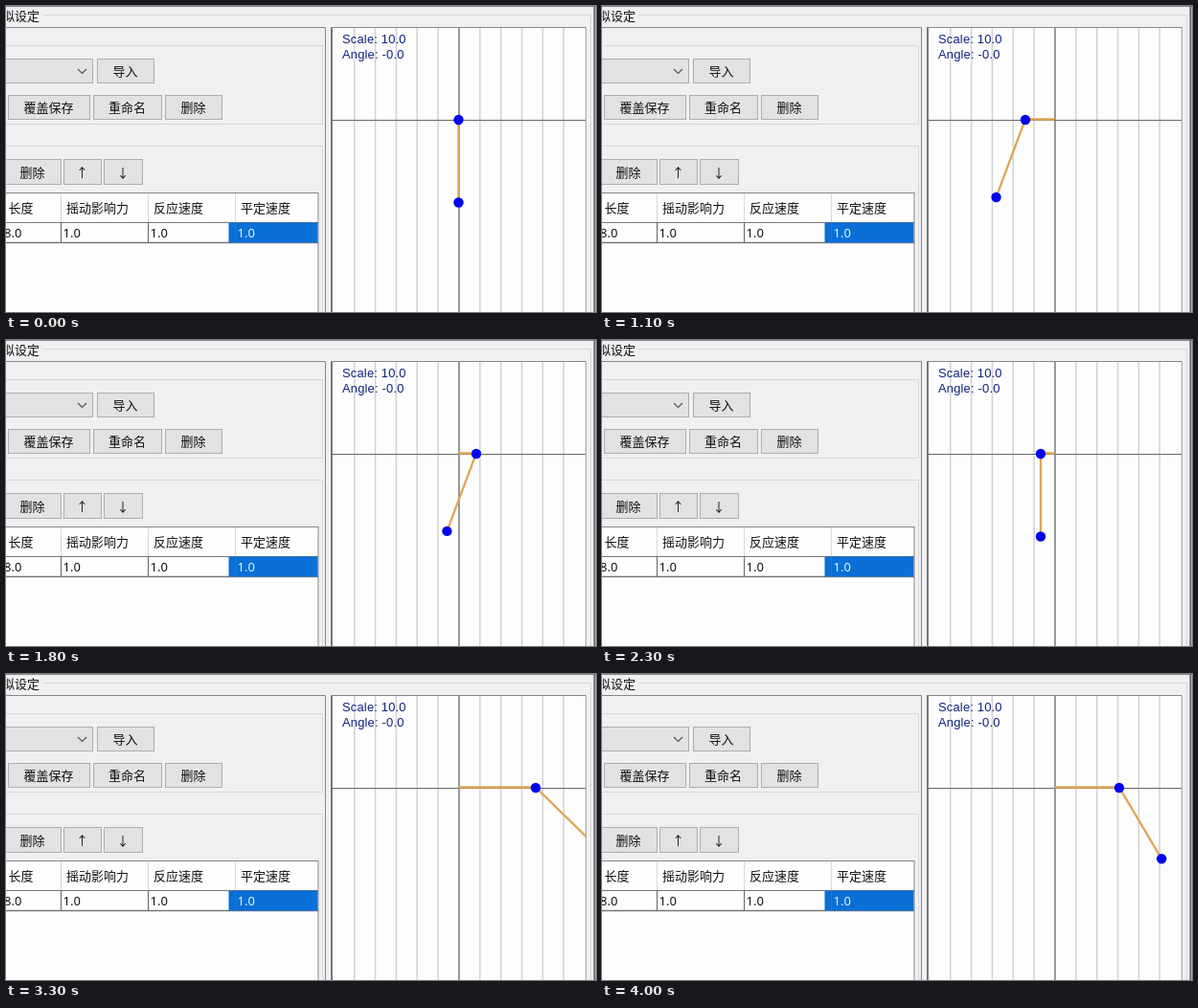
An HTML page with a canvas that plays this animation: 616x320 px, repeating every 4.1 s.

```html
<!DOCTYPE html>
<html lang="zh-CN">
<head>
<meta charset="utf-8">
<title>摇动模拟</title>
<style>
  html, body { margin: 0; width: 100%; height: 100%; overflow: hidden; background: #f0eff1; }
  canvas { display: block; }
</style>
</head>
<body>
<canvas id="stage" width="616" height="320"></canvas>
<script>
const ctx = document.getElementById('stage').getContext('2d');
const LOOP = 4100, STEP = 100;
const AXIS_X = 472.5, AXIS_Y = 119, GRID = 21.85, ROD = 86.5;
const UI_FONT = '13px "Noto Sans CJK SC", "Noto Sans CJK", "Noto Sans", sans-serif';
const NUMBER_FONT = '13px "Noto Sans", "Open Sans", sans-serif';
const PLOT_FONT = '13px "Liberation Sans", Arial, sans-serif';

// Pivot x, swing amplitude in degrees and half swings completed
const poses = [
  { t: 0, x: AXIS_X, amp: 0, beats: 0 },
  { t: 500, x: 416, amp: 7.3, beats: 1 },
  { t: 1100, x: 442, amp: 20.6, beats: 3 },
  { t: 1450, x: 499, amp: 20.6, beats: 4 },
  { t: 1800, x: 491, amp: 20.7, beats: 5 },
  { t: 2800, x: 425, amp: 22, beats: 8 },
  { t: 3300, x: 553, amp: 45.8, beats: 10 },
  { t: 4000, x: 540, amp: 30.8, beats: 12 },
];

const mix = (a, b, u) => a + (b - a) * u;

// The pivot eases from pose to pose while the rod swings like a cosine
function poseAt(t) {
  const next = Math.max(1, poses.findIndex(p => p.t >= t));
  const a = poses[next - 1], b = poses[next];
  const u = (t - a.t) / (b.t - a.t);
  const angle = mix(a.amp, b.amp, u) * Math.cos(Math.PI * mix(a.beats, b.beats, u));
  return { x: mix(a.x, b.x, u * u * (3 - 2 * u)), angle: angle * Math.PI / 180 };
}

function line(color, width, ...points) {
  ctx.strokeStyle = color;
  ctx.lineWidth = width;
  ctx.beginPath();
  for (let i = 0; i < points.length; i += 2) ctx.lineTo(points[i], points[i + 1]);
  ctx.stroke();
}

function box(x, y, w, h, fill, border) {
  ctx.fillStyle = fill;
  ctx.fillRect(x, y, w, h);
  if (!border) return;
  ctx.strokeStyle = border;
  ctx.lineWidth = 1;
  ctx.strokeRect(x, y, w, h);
}

function label(text, x, y, color = '#111', font = UI_FONT, align = 'left') {
  ctx.font = font;
  ctx.fillStyle = color;
  ctx.textAlign = align;
  ctx.fillText(text, x, y);
}

function button(text, x, y, w, h = 25) {
  box(x, y, w, h, '#e2e1e3', '#adadad');
  label(text, x + w / 2 - .6, y + h / 2 + 5, '#111', UI_FONT, 'center');
}

function dot(x, y) {
  ctx.fillStyle = '#0004ee';
  ctx.beginPath();
  ctx.arc(x, y, 5.2, 0, 2 * Math.PI);
  ctx.fill();
}

function drawForm() {
  box(0, 0, 616, 320, '#f0eff1');
  line('#88888c', 1, 0, .5, 616, .5);
  line('#66666a', 2, 614.5, 0, 614.5, 320);
  line('#d6d5d7', 1, 38, 9.5, 610.5, 9.5, 610.5, 320);
  label('拟设定', -4, 15);

  line('#85858a', 1, 0, 22.5, 333.5, 22.5, 333.5, 320);
  line('#d6d5d7', 1, 0, 41.5, 330.5, 41.5, 330.5, 123.5, 0, 123.5);
  line('#d6d5d7', 1, 0, 146.5, 330.5, 146.5, 330.5, 320);

  button('', -9.5, 55.5, 100);
  line('#555', 1.2, 75, 66, 79.5, 70.5, 84, 66);
  button('导入', 95.5, 55.5, 59);
  button('', -60.5, 93.5, 60);
  button('覆盖保存', 2.5, 93.5, 85);
  button('重命名', 91.5, 93.5, 71);
  button('删除', 166.5, 93.5, 59);
  button('删除', -1.5, 160.5, 59, 26);
  button('↑', 60.5, 160.5, 39, 26);
  button('↓', 102.5, 160.5, 40, 26);
}

function drawTable() {
  box(-9.5, 195.5, 335.5, 140, '#fdfdfd', '#85858a');
  line('#77777a', 1, 0, 226.5, 326, 226.5);
  line('#77777a', 1.5, 0, 247.5, 326, 247.5);
  box(232.5, 226.5, 93, 21, '#0a6fd6');
  ['长度', '摇动影响力', '反应速度', '平定速度'].forEach((title, i) => {
    const left = 57.5 + (i - 1) * 91, selected = i === 3;
    line('#d8d8da', 1, left, 196, left, 226);
    line('#66666a', 1, left, 226, left, 248);
    label(title, i ? left + 5.5 : 2.5, 216);
    label(i ? '1.0' : '8.0', i ? left + 2 : -2, 241.5, selected ? '#e8f2ff' : '#111', NUMBER_FONT);
  });
}

function drawPlot(t) {
  const { x, angle } = poseAt(t);
  const tipX = x + ROD * Math.sin(angle), tipY = AXIS_Y + ROD * Math.cos(angle);

  ctx.save();
  ctx.beginPath();
  ctx.rect(339, 22, 267, 298);
  ctx.clip();
  box(339, 22, 267, 298, '#fdfdfd');
  for (let i = -5; i <= 5; i++) {
    const gridX = AXIS_X + .5 + i * GRID;
    line(i ? '#d2d2d4' : '#77777a', 1.5, gridX, 22, gridX, 320);
  }
  line('#66666a', 1, 340, 119.5, 606, 119.5);
  ctx.letterSpacing = '0.15px';
  label('Scale: 10.0', 351, 39, '#10247c', PLOT_FONT);
  label('Angle: -0.0', 351, 55, '#10247c', PLOT_FONT);
  ctx.letterSpacing = '0px';
  line('#e0a556', 2.3, AXIS_X, AXIS_Y - .5, x, AXIS_Y - .5, tipX, tipY);
  dot(x, AXIS_Y);
  dot(tipX, tipY);
  line('#77777a', 2, 340, 320, 340, 22);
  line('#85858a', 1, 339, 22.5, 606, 22.5);
  line('#a5a5a8', 1, 605.5, 22, 605.5, 320);
  ctx.restore();
}

function frame() {
  const t = Math.floor(performance.now() % LOOP / STEP) * STEP;
  drawForm();
  drawTable();
  drawPlot(t);
  requestAnimationFrame(frame);
}
frame();
</script>
</body>
</html>
```
